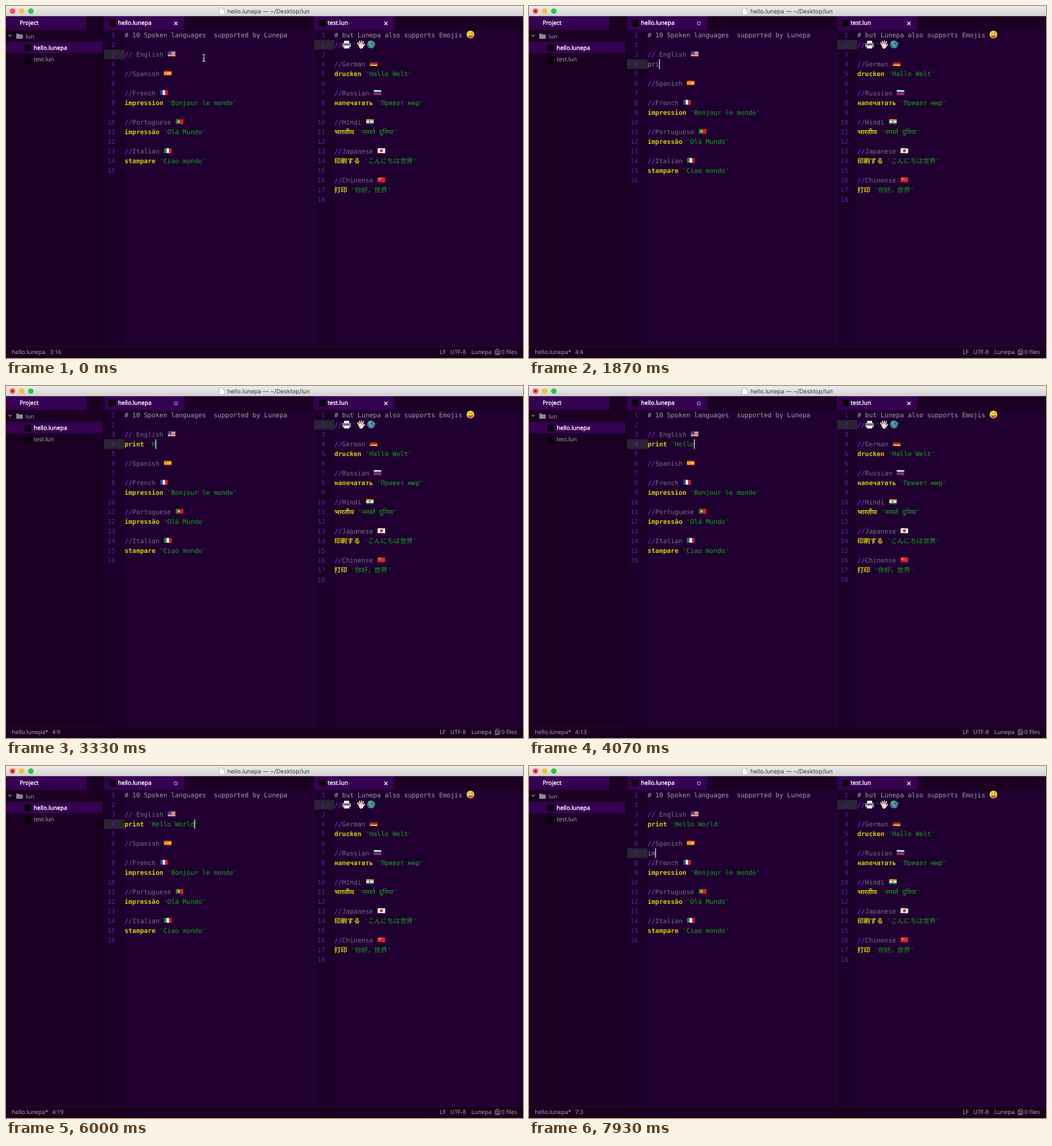
An HTML page for the animation above (8000 ms loop, 907 by 618 pixels).

```html
<!DOCTYPE html>
<html lang="en">
<head>
<meta charset="utf-8">
<title>Editor</title>
<style>
html, body { margin: 0; width: 100%; height: 100%; overflow: hidden; background: #200030; }
svg { display: block; width: 907px; height: 618px; }
text { white-space: pre; text-rendering: geometricPrecision; }
.ui { font: 10.1px "Noto Sans", "Open Sans", sans-serif; fill: #aca4b4; }
.strong { fill: #fff; stroke: #fff; stroke-width: .35px; }
.title { font: 10.3px Inter, Roboto, sans-serif; fill: #3c3c3c; }
.code { font: 11.31px "DejaVu Sans Mono", "Noto Sans Mono", "Noto Sans CJK JP", "Noto Sans CJK SC", "Noto Sans", "Noto Sans Devanagari", monospace; }
.num { fill: #5c23a8; text-anchor: end; }
.head { fill: #a29ca9; }
.slash { fill: #7d2ee8; font-weight: bold; }
.note { fill: #74708a; }
.key { fill: #d2cc0c; font-weight: bold; }
.str { fill: #14a31e; }
.quote { fill: #12591f; }
.plain { fill: #8f899b; }
</style>
</head>
<body>
<svg id="stage" viewBox="0 0 907 618"></svg>
<script>
const ADV = 6.81, LINE = 17, LOOP = 8000, LEFT = 208, RIGHT = 576;
const lineY = n => 51 + LINE * (n - 1);

const rect = (x, y, w, h, fill, more = '') =>
  `<rect x="${x}" y="${y}" width="${w}" height="${h}" fill="${fill}" ${more}/>`;
const disc = (x, y, r, fill, more = '') =>
  `<circle cx="${x}" cy="${y}" r="${r}" fill="${fill}" ${more}/>`;
const path = (d, fill, stroke = 'none', width = 1) =>
  `<path d="${d}" fill="${fill}" stroke="${stroke}" stroke-width="${width}" stroke-linecap="round"/>`;
const text = (x, y, cls, s, more = '') =>
  `<text x="${x}" y="${y}" class="${cls}" ${more}>${s}</text>`;
const span = (cls, s) => `<tspan class="${cls}">${s}</tspan>`;

// Syntax colouring
function paint(s, isKey = true) {
  if (s[0] === '#') return span('head', s);
  if (s.startsWith('//')) return span('slash', '//') + span('note', s.slice(2));
  const [word, body, end] = s.split('"');
  return span(isKey ? 'key' : 'plain', word) +
    (body === undefined ? '' : span('quote', '"') + span('str', body)) +
    (end === undefined ? '' : span('quote', '"'));
}
const code = (x, n, s) => text(x, lineY(n) + 4, 'code', paint(s));
const numbers = (x, count) => Array.from({ length: count }, (_, i) =>
  text(x, lineY(i + 1) + 4, 'code num', i + 1)).join('');

// Flags: stripe colours, direction, optional emblem
const RED = '#d9232e', WHITE = '#f4f2f2', GREEN = '#168a45', GOLD = '#f6c520', BLUE = '#2547a5';
const flags = {
  us: [[RED, WHITE, RED, WHITE, RED, WHITE, RED], 'h', rect(0, 0, 6.4, 5.6, BLUE)],
  es: [[RED, GOLD, GOLD, RED], 'h', disc(4, 5, 1.3, '#b5542a')],
  fr: [[BLUE, WHITE, RED], 'v'],
  pt: [[GREEN, GREEN, RED, RED, RED], 'v', disc(5.4, 5, 2, GOLD)],
  it: [[GREEN, WHITE, RED], 'v'],
  de: [['#181818', RED, GOLD], 'h'],
  ru: [[WHITE, BLUE, RED], 'h'],
  in: [['#f59332', WHITE, GREEN], 'h', disc(6.7, 5, 1.2, BLUE)],
  jp: [[WHITE], 'h', disc(6.7, 5, 2.6, RED)],
  cn: [[RED], 'h', disc(3.2, 3.4, 1.3, GOLD) + disc(6.2, 2.6, .5, GOLD) + disc(6.4, 4.8, .5, GOLD)]
};
function flag(x, n, name) {
  const [colors, dir, emblem = ''] = flags[name], k = colors.length;
  const stripes = colors.map((c, i) => dir === 'h'
    ? rect(0, i * 10.4 / k, 13.5, 10.4 / k + .1, c)
    : rect(i * 13.5 / k, 0, 13.5 / k + .1, 10.4, c)).join('');
  return `<g transform="translate(${x + 1} ${lineY(n) - 6})" clip-path="url(#wave)">${stripes}${emblem}</g>`;
}
const comment = (x, n, s, name) => code(x, n, s) + flag(x + (s.length + 1) * ADV, n, name);

const face = disc(814.8, 50, 6.8, '#ffd03a') + disc(812.2, 48, 1.6, '#fff') + disc(812.4, 48, .9, '#55351a') +
  path('M816 48q1.5-1.6 3 0', 'none', '#6b431c') + path('M810.5 51.5q4.5 1.5 8.6-.5q-.4 4.6-4 4.6q-3.6 0-4.6-4.1Z', '#6b3a18') +
  path('M813.5 53q2-1 4 0v2.6q-2 2-4 0Z', '#f0587a');
const printer = rect(593, 61, 9, 6, '#eceaf0') + rect(590, 65, 15, 7.5, '#a9a7b4', 'rx="1.5"') +
  rect(591.5, 66.5, 12, 2, '#55525f') + rect(593, 70, 9, 4.5, '#f5f5f7') + disc(603, 70, .6, '#4cc75a');
const hand = path('M619.5 69L617 64.5M621 67L620 62M623.2 67L623.6 61.5M625.3 67.5L627 62.7M626 71L629 67.5', 'none', '#f5dcc4', 2) +
  path('M618.4 68q4-2.5 8 0l.8 3q-1.6 4-4.6 4q-3 0-4.2-7Z', '#f5dcc4');
const globe = disc(640.4, 67.5, 7.1, '#2c78bd') +
  path('M635 63.5q3-3.5 6-2.6l1.4 1.8l-2.6 1.5l-.4 2.8l2 1.2l2.4 1l-1.6 3l-1.4 1.7l-1.4-3.6l-2.5-2.3Z', '#68ae55') +
  path('M644.5 63l2 2.5l-.5 2.2l-1.6-2Z', '#68ae55');

const frame =
  rect(0, 0, 907, 618, '#200030') + rect(0, 18, 172, 580, '#1b0024') +
  rect(172, 18, 735, 24, '#1a0023') + rect(172, 42, 36, 556, '#1b0029') + rect(541, 42, 35, 556, '#1b0029') +
  rect(169, 18, 3, 580, '#17001f') + rect(540, 18, 1, 580, '#2d0a3e') +
  rect(0, 18, 141, 24, '#360050') + rect(172, 18, 141, 24, '#360050') + rect(541, 18, 141, 24, '#360050') +
  rect(0, 63, 169, 20, '#360050') + rect(0, 597, 907, 21, '#1a001f') + rect(0, 597, 907, 1, '#2c0b38') +
  rect(0, 0, 907, 18, 'url(#bar)') + rect(0, 17, 907, 1, '#b3afb5') +
  disc(11.4, 9, 4.8, '#fc504c') + disc(27.5, 9, 4.8, '#fdbc30') + disc(43.6, 9, 4.8, '#28c840') +
  path('M374.5 3.5h6l3 3v8.5h-9Z', '#fff', '#aaa', .7) + path('M380.5 3.5v3h3', 'none', '#aaa', .7) +
  text(388.5, 13, 'title', 'hello.lunepa — ~/Desktop/lun') +
  text(24, 33.3, 'ui strong', 'Project') + text(196.5, 33.3, 'ui strong', 'hello.lunepa') +
  text(564.3, 33.3, 'ui strong', 'test.lun') +
  path('M4.7 50.8l2.5 2.5l2.5-2.5', 'none', '#a49bab', 1.1) +
  path('M18 48.5h4.5l1 1.5h6v7.5h-11.5Z', '#8f8795') +
  text(34.5, 56.6, 'ui', 'lun') + text(48.5, 76.6, 'ui strong', 'hello.lunepa') + text(48.5, 96.8, 'ui', 'test.lun') +
  [[32, 67.5], [32, 88], [180.5, 24], [549.5, 24]].map(([x, y]) => rect(x, y, 12, 12, '#08040a')).join('') +
  path('M664 28l5 5m0-5l-5 5', 'none', '#fff', 1.2) +
  text(761, 611, 'ui', 'LF') + text(779.5, 611, 'ui', 'UTF-8') + text(816.5, 611, 'ui', 'Lunepa') +
  text(869, 611, 'ui', '0 files') +
  path('M860.5 602.5h4l2 2v6.5h-6Z M860.5 604.5h-2.2v8h6v-1.5 M862 606.5h3m-1.5-1.5v3m-1.5 1.3h3', 'none', '#aca4b4', .8);

const leftTop = code(LEFT, 1, '# 10 Spoken languages  supported by Lunepa') + comment(LEFT, 3, '// English', 'us');
const leftRest = comment(LEFT, 5, '//Spanish', 'es') +
  comment(LEFT, 7, '//French', 'fr') + code(LEFT, 8, 'impression "Bonjour le monde"') +
  comment(LEFT, 10, '//Portuguese', 'pt') + code(LEFT, 11, 'impressão "Olá Mundo"') +
  comment(LEFT, 13, '//Italian', 'it') + code(LEFT, 14, 'stampare "Ciao mondo"');

const right = rect(541, lineY(2) - 8.5, 35, LINE, '#2a2433') + numbers(560, 18) +
  code(RIGHT, 1, '# but Lunepa also supports Emojis') + face +
  code(RIGHT, 2, '//') + printer + hand + globe +
  text(607, lineY(2) + 4, 'code quote', '"') + text(645, lineY(2) + 4, 'code quote', '"') +
  comment(RIGHT, 4, '//German', 'de') + code(RIGHT, 5, 'drucken "Hallo Welt"') +
  comment(RIGHT, 7, '//Russian', 'ru') + code(RIGHT, 8, 'напечатать "Привет мир"') +
  comment(RIGHT, 10, '//Hindi', 'in') + code(RIGHT, 11, 'भारतीय "नमस्ते दुनिया"') +
  comment(RIGHT, 13, '//Japanese', 'jp') + code(RIGHT, 14, '印刷する "こんにちは世界"') +
  comment(RIGHT, 16, '//Chinense', 'cn') + code(RIGHT, 17, '打印 "你好，世界"');

const stage = document.getElementById('stage');
stage.innerHTML = `<defs>
  <linearGradient id="bar" x2="0" y2="1"><stop stop-color="#ededed"/><stop offset="1" stop-color="#d2d0d3"/></linearGradient>
  <clipPath id="wave"><path d="M0 1.2C4.5-1 8.5 2.2 13.5.4V9C8.5 10.8 4.5 7.6 0 9.8Z"/></clipPath></defs>` +
  frame + rect(172, 0, 36, LINE, '#2a2433', 'id="active"') + numbers(191.5, 15) +
  leftTop + `<g id="rest">${leftRest}</g>` + right +
  `<g id="saved">${path('M295.5 28l5 5m0-5l-5 5', 'none', '#fff', 1.2)}
    ${path('M344.5 85q2.5 0 2.5 2v8q0 2-2.5 2M349.5 85q-2.5 0-2.5 2m0 8q0 2 2.5 2M345.5 92h3', 'none', '#ddd8e2', 1.1)}</g>
  <g id="dirty">${disc(298, 30.5, 2.7, 'none', 'stroke="#6f7cf0" stroke-width="1.5"')}${disc(11.4, 9, 1.7, '#7c1512')}
    ${text(191.5, lineY(16) + 4, 'code num', 16)}</g>` +
  text(LEFT, lineY(4) + 4, 'code', '', 'id="first"') + text(LEFT, lineY(7) + 4, 'code', '', 'id="second"') +
  text(10, 611, 'ui', '', 'id="file"') + text(77, 611, 'ui', '', 'id="place"') +
  rect(0, 0, 1.2, LINE, '#fff', 'id="caret"');
const el = Object.fromEntries([...stage.querySelectorAll('g[id], text[id], rect[id]')].map(e => [e.id, e]));

// Each step: time, row, column, letters typed on row 4, letters typed on row 7
const PHRASE = 'print "Hello World', ENTER = 180;
const keyTimes = [1400, 1600, 1750, 1900, 2100, 2350, 2950, 3150, 3400, 3600, 3750, 3950, 4400, 4800, 5100, 5400, 5600, 5800];
const steps = [
  [-750, 3, 16, 0, 0], [ENTER, 4, 1, 0, 0],
  ...keyTimes.map((t, i) => [t, 4, i + 2, i + 1, 0]),
  [6150, 5, 1, 18, 0], [6400, 6, 15, 18, 0], [6900, 7, 1, 18, 0],
  [7500, 7, 2, 18, 1], [7800, 7, 3, 18, 2]
];
const flagStops = { '3:16': 296, '6:15': 287.2 };

let shown;
function render(t) {
  const step = steps.findLast(s => s[0] <= t), [since, row, col, typed, extra] = step;
  const age = t - since;
  const lit = age < 700 || Math.floor((age - 700) / 400) % 2 === 1;
  el.caret.setAttribute('visibility', lit ? 'visible' : 'hidden');
  if (step === shown) return;
  shown = step;

  const dirty = t >= ENTER, place = `${row}:${col}`;
  el.saved.setAttribute('display', dirty ? 'none' : 'inline');
  el.dirty.setAttribute('display', dirty ? 'inline' : 'none');
  el.rest.setAttribute('transform', `translate(0 ${dirty ? LINE : 0})`);
  el.active.setAttribute('y', lineY(row) - 8.5);
  el.caret.setAttribute('x', flagStops[place] || LEFT + (col - 1) * ADV - .2);
  el.caret.setAttribute('y', lineY(row) - 8.5);
  el.first.innerHTML = paint(PHRASE.slice(0, typed) + (typed > 6 ? '"' : ''), typed > 4);
  el.second.innerHTML = paint('im'.slice(0, extra), false);
  el.file.textContent = 'hello.lunepa' + (dirty ? '*' : '');
  el.place.textContent = place;
  el.place.setAttribute('x', dirty ? 81 : 77);
}
function tick(now) {
  render(now % LOOP);
  requestAnimationFrame(tick);
}
render(0);
requestAnimationFrame(tick);
</script>
</body>
</html>
```
